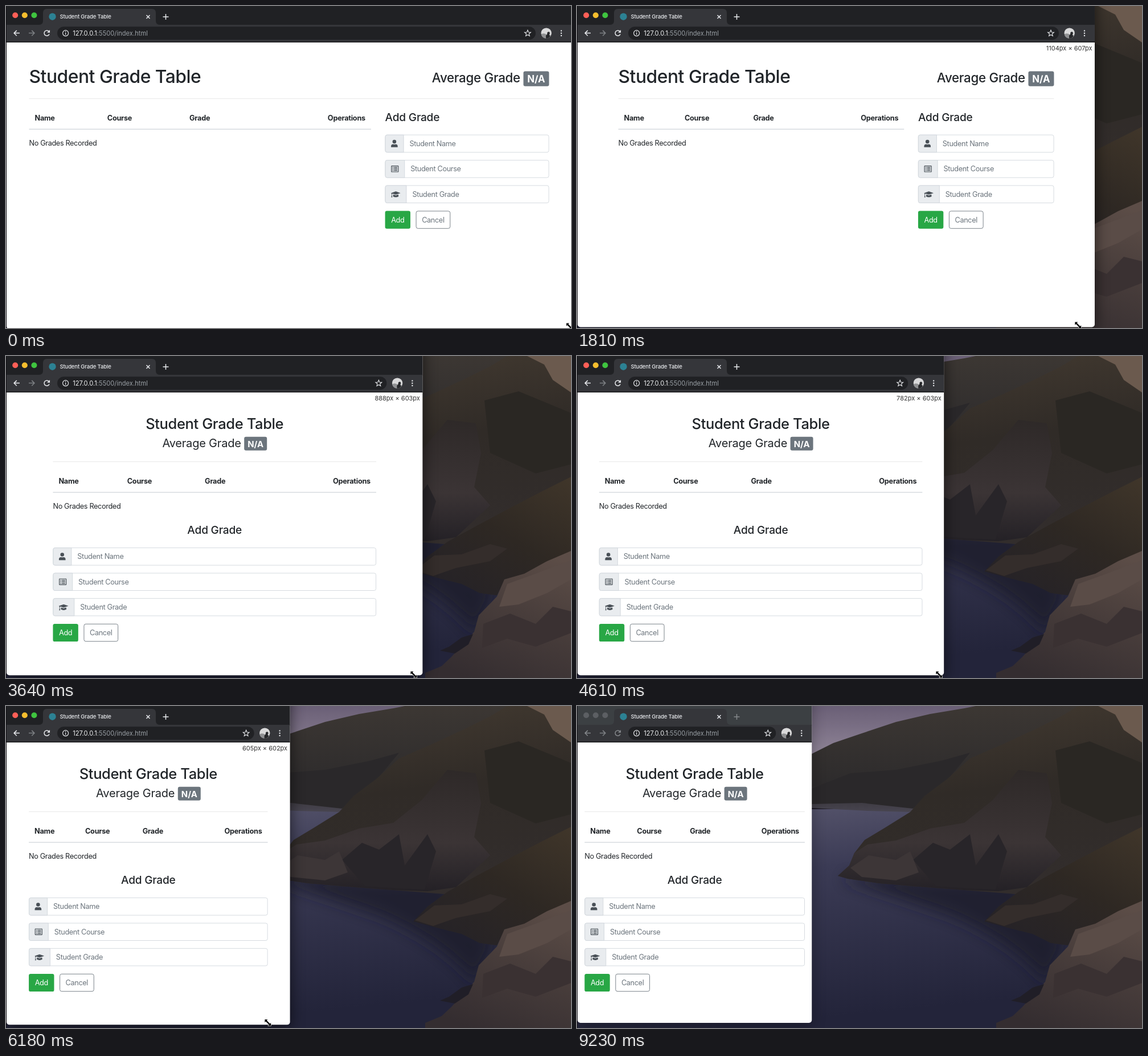
Write an HTML page that moves like this. It is 992 px wide and 565 px high and loops after 9330 ms.

```html
<!DOCTYPE html>
<html lang="en">
<head>
<meta charset="utf-8">
<title>Student Grade Table</title>
<style>
html, body { margin: 0; width: 100%; height: 100%; overflow: hidden; background: #17141d; }
svg { display: block; width: 100vw; height: 100vh; }
text { font-family: Inter, "Open Sans", sans-serif; font-optical-sizing: none; white-space: pre; fill: #212529; }
.body { font-size: 12.7px; letter-spacing: -.028em; }
.head { font-size: 12.7px; font-weight: 700; letter-spacing: -.02em; }
.hint { fill: #6c757d; }
.title { font-size: 31.8px; font-weight: 550; letter-spacing: -.015em; }
.avg { font-size: 22.3px; font-weight: 500; letter-spacing: -.012em; }
.stacked .title { font-size: 25.5px; }
.stacked .avg { font-size: 20px; font-weight: 400; letter-spacing: -.01em; }
.badge { font-size: 16.7px; font-weight: 700; fill: #fff; }
.stacked .badge { font-size: 14.9px; }
.sub { font-size: 19.1px; font-weight: 550; letter-spacing: -.011em; }
.tab { font-size: 9.55px; font-weight: 500; letter-spacing: -.018em; fill: #e8eaed; }
.url { font-size: 11.1px; letter-spacing: .004em; fill: #9aa0a6; }
.size { font-size: 11px; fill: #333; }
.mid { text-anchor: middle; }
.end { text-anchor: end; }
.nav { fill: none; stroke: #e8eaed; stroke-width: 1.5; }
.strip { fill: #202124; }
.bar { fill: #35363a; }
.idle .strip { fill: #3c4043; }
.idle .light { fill: #5c5f63; }
.idle .dim { stroke: #85888c; }
.box { stroke: #ced4da; stroke-width: .83; }
.icon { fill: #495057; }
</style>
</head>
<body>
<svg viewBox="0 0 992 565" preserveAspectRatio="none">
  <defs>
    <linearGradient id="sky" x2="0" y2="1"><stop stop-color="#6a5f76"/><stop offset="1" stop-color="#8f8497"/></linearGradient>
    <linearGradient id="sea" x2=".25" y2="1"><stop stop-color="#5b5970"/><stop offset=".35" stop-color="#3b3b55"/><stop offset="1" stop-color="#23243a"/></linearGradient>
    <linearGradient id="far" x2="0" y2="1"><stop stop-color="#3c3733"/><stop offset=".75" stop-color="#2d2b2c"/><stop offset="1" stop-color="#484550"/></linearGradient>
    <linearGradient id="hill" x2=".2" y2="1"><stop stop-color="#443b31"/><stop offset=".5" stop-color="#302b27"/><stop offset="1" stop-color="#322d2c"/></linearGradient>
    <linearGradient id="cliff" x2="0" y2="1"><stop stop-color="#2e2928"/><stop offset=".6" stop-color="#3b3435"/><stop offset="1" stop-color="#242126"/></linearGradient>
    <linearGradient id="slope" x1="1" x2=".2" y2="1"><stop stop-color="#40362a"/><stop offset=".5" stop-color="#2e2823"/><stop offset="1" stop-color="#252227"/></linearGradient>
    <linearGradient id="rock" x1=".8" x2=".3" y2="1"><stop stop-color="#5c4d47"/><stop offset=".45" stop-color="#483d3b"/><stop offset="1" stop-color="#342d30"/></linearGradient>
    <filter id="blur" x="-30%" y="-30%" width="160%" height="160%"><feGaussianBlur stdDeviation="13"/></filter>
  </defs>

  <g id="desktop">
    <path fill="url(#sky)" d="M0 0H992V86H0Z"/>
    <path fill="url(#sea)" d="M0 181H992V565H0Z"/>
    <path fill="#1d1c2c" opacity=".8" filter="url(#blur)" d="M470 300H770L860 415 825 485Q760 410 650 366Q560 335 470 306Z"/>
    <path fill="url(#far)" d="M0 115H330L412 84 450 65 500 48 560 28 620 14 680 4 700 0H992V186H585L510 184 412 179H0Z"/>
    <path fill="#2a282a" d="M412 145L480 118 560 112 640 96 690 82 640 142 590 180 500 170 412 172Z"/>
    <path fill="url(#hill)" d="M458 298L478 280 487 258 505 235 540 214 585 186 610 158 650 128 690 92 750 66 810 38 850 18 880 0H992V345L770 330 680 323 600 317 530 311 475 303Z"/>
    <path fill="url(#cliff)" d="M458 298L478 280 487 258 510 243 560 236 620 215 680 205 730 165 775 112 825 118 834 170 822 230 850 262 790 318 740 325 680 323 600 317 530 311 475 303Z"/>
    <path fill="#282529" d="M590 270L625 240 655 252 690 225 700 280 740 225 755 255 735 322 690 320 630 316Z"/>
    <path fill="#3d3637" d="M480 284L512 262 560 270 585 255 600 292 560 306 500 300Z"/>
    <path fill="#6b5a4e" d="M915 0L945 15 960 42 992 64V0Z"/>
    <path fill="#2a2723" d="M840 78L900 62 992 100V190L930 206 850 170Z"/>
    <path fill="url(#slope)" d="M715 378L740 352 775 326 830 296 890 264 940 238 992 212V352L950 364 905 386 875 395 862 420 832 416 800 400 760 390Z"/>
    <path fill="#342d2b" d="M718 376L752 350 800 348 850 330 880 338 850 360 790 372 750 386Z"/>
    <path fill="url(#rock)" d="M736 556L765 544 782 528 822 484 830 455 862 422 875 392 910 382 950 360 992 342V565H736Z"/>
    <path fill="#5a4c47" d="M880 400L930 382 992 358V392L950 416 900 436 866 440Z"/>
    <path fill="#3a3132" d="M838 470L885 452 930 470 960 440 992 448V486L930 510 880 496 836 512Z"/>
    <path fill="#201e27" d="M762 517L778 510 800 494 820 488 812 506 788 522Z"/>
    <path fill="#17141d" d="M0 0H1V565H0Z"/>
  </g>

  <rect id="shadow" x="1" y="-30" filter="url(#blur)"/>
  <g id="win">
    <rect id="frame" x="1" y="-20" rx="5" fill="#fff"/>
    <g id="chrome">
      <rect class="strip wide" x="1" height="34"/>
      <rect class="bar wide" x="1" y="33" height="30"/>
      <rect class="wide" x="1" y="62.4" height="1.6" fill="#1d1e20"/>
      <path class="bar" d="M58 33Q65 33 65 26V12Q65 5 72 5H256Q263 5 263 12V26Q263 33 270 33Z"/>
      <circle class="light" cx="16.2" cy="16.2" r="5" fill="#ff5f57"/>
      <circle class="light" cx="32.8" cy="16.2" r="5" fill="#f6be2e"/>
      <circle class="light" cx="49.4" cy="16.2" r="5" fill="#3fc43f"/>
      <circle cx="81.5" cy="18.7" r="6.2" fill="#2c8193"/>
      <text class="tab" x="94.5" y="22.3">Student Grade Table</text>
      <path class="nav" d="M246.5 16l6 6m0-6l-6 6"/>
      <path class="nav dim" d="M280.5 14v10m-5-5h10"/>
      <path class="nav dim" d="M24 47.6H14.2m4.6-4.7l-4.7 4.7 4.7 4.7"/>
      <path class="nav" style="stroke:#7d8084" d="M40 47.6h9.8m-4.6-4.7l4.7 4.7-4.7 4.7"/>
      <path class="nav dim" d="M75.6 45.2A4.6 4.6 0 1 0 76 49.2M76.3 42.6v3.5h-3.6"/>
      <rect id="omni" class="strip" style="fill:#202124" x="90" y="36.2" height="23" rx="11.5"/>
      <circle class="nav" cx="104.6" cy="47.7" r="5" style="stroke-width:1.2"/>
      <path class="nav" style="stroke-width:1.3" d="M104.6 47v3.6m0-6v1.3"/>
      <text class="url" x="117.2" y="51.8"><tspan fill="#f1f3f4">127.0.0.1</tspan>:5500/index.html</text>
      <g id="tools">
        <path id="star" class="nav" style="stroke-width:1.1"/>
        <circle cx="-44.3" cy="47.6" r="9.2" fill="#d9d9da"/>
        <path fill="#8f9092" d="M-53.3 49.5Q-48 47-44 50T-35.6 50.6A9.2 9.2 0 0 1-53.3 49.5Z"/>
        <path fill="#26272a" d="M-45 56.8V52Q-43 50-42.6 48.5A2.4 2.4 0 1 1-39 49.6L-37.6 53.7A9.2 9.2 0 0 1-45 56.8Z"/>
        <path stroke="#e8eaed" stroke-width="2.4" stroke-linecap="round" d="M-18 43.4h.01m-.01 4.3h.01m-.01 4.3h.01"/>
      </g>
    </g>
    <g id="page">
      <text class="title" id="title">Student Grade Table</text>
      <text class="avg end" id="avg">Average Grade</text>
      <rect id="badge" rx="3.2" fill="#6c757d"/>
      <text class="badge mid" id="na">N/A</text>
      <rect id="rule" height=".9" fill="#e6e6e6"/>
      <g id="table">
        <text class="head" x="10" y="201">Name</text>
        <text class="head" id="course" y="201">Course</text>
        <text class="head" id="grade" y="201">Grade</text>
        <text class="head end" id="ops" y="201">Operations</text>
        <rect id="line" y="215.4" height="1.6" fill="#d9dde1"/>
        <text class="body" y="245.4">No Grades Recorded</text>
      </g>
      <g id="form">
        <text class="sub" id="sub" y="-24">Add Grade</text>
        <rect y="133.7" width="44.4" height="31.2" rx="3.2" fill="#28a745"/>
        <text class="body mid" x="22.2" y="153.8" style="fill:#fff">Add</text>
        <rect x="54.5" y="134.1" width="59.7" height="30.4" rx="3.2" fill="#fff" stroke="#6c757d" stroke-width=".9"/>
        <text class="body hint mid" x="84.3" y="153.8">Cancel</text>
      </g>
      <text class="size end" id="size" y="78"></text>
    </g>
  </g>
  <path id="cursor" fill="#000" stroke="#fff" stroke-width="1.1" paint-order="stroke" stroke-linejoin="round"
    d="M-5.6-5.4H-.6L-2.2-3.8 3.5 1.9 5.2.3V5.4H.2L1.8 3.8-3.9-1.9-5.6-.3Z"/>
</svg>
<script>
const LOOP = 9330, SCALE = .8225;
const $ = id => document.getElementById(id);
const set = (node, attrs) => { for (const k in attrs) node.setAttribute(k, attrs[k]); };
const make = (tag, attrs, parent) => {
  const node = document.createElementNS("http://www.w3.org/2000/svg", tag);
  set(node, attrs);
  return parent.appendChild(node);
};

// [start, end, steps] of each run of screen updates
const RUNS = [[710, 1630, 11], [1720, 2570, 10], [2660, 2840, 3], [3110, 3990, 11],
  [4080, 4970, 11], [5060, 5410, 5], [5580, 6440, 11], [6530, 7320, 10]];
// [time, value] keys; page size in CSS pixels, mouse in stage pixels
const WIDTH = [[620, 1206], [1630, 1120], [1814, 1104], [2570, 988], [2840, 967], [3020, 967], [3638, 888],
  [3990, 802], [4614, 782], [4970, 733], [5410, 697], [5490, 697], [6182, 605], [6440, 553], [6950, 500]];
const HEIGHT = [[620, 611], [1814, 607], [3638, 603], [4614, 603], [6182, 602], [7320, 598]];
const MOUSE_X = [[620, 989.5], [1630, 900], [1814, 880], [2570, 797], [2840, 785], [3020, 785], [3638, 716],
  [3990, 651], [4614, 636], [4970, 594], [5410, 562], [5490, 562], [6182, 460], [6440, 428], [7320, 378]];
const MOUSE_Y = [[620, 562], [1814, 560], [3638, 559], [4614, 559], [6182, 555.5], [7320, 554]];

function snap(t) {
  let at = 0;
  for (const [start, end, steps] of RUNS) {
    if (t < start) break;
    const gap = (end - start) / (steps - 1);
    at = start + gap * Math.min(steps - 1, Math.floor((t - start) / gap + .1));
  }
  return at;
}

function tween(keys, t) {
  if (t <= keys[0][0]) return keys[0][1];
  for (let i = 1; i < keys.length; i++) {
    const [t0, a] = keys[i - 1], [t1, b] = keys[i];
    if (t <= t1) return a + (b - a) * (t - t0) / (t1 - t0);
  }
  return keys[keys.length - 1][1];
}

// star outline
const points = [];
for (let i = 0; i < 10; i++) {
  const r = i % 2 ? 2.5 : 5.7, a = i * Math.PI / 5;
  points.push((-77 + r * Math.sin(a)).toFixed(2) + " " + (48 - r * Math.cos(a)).toFixed(2));
}
$("star").setAttribute("d", "M" + points.join("L") + "Z");

const ICONS = [
  "M16.3 9a3.3 3.3 0 1 1 0 6.6a3.3 3.3 0 0 1 0-6.6ZM10.5 22v-1.6q0-3.7 3.6-3.7q2.2.9 4.4 0q3.6 0 3.6 3.7V22Z",
  "M11.8 9.8H22.6q1.2 0 1.2 1.2v9.2q0 1.2-1.2 1.2H11.8q-1.2 0-1.2-1.2V11q0-1.2 1.2-1.2ZM11.8 11v9.2h10.8V11ZM13 12.2h1.6v1.5H13Zm2.6 0h5.8v1.5h-5.8ZM13 14.9h1.6v1.5H13Zm2.6 0h5.8v1.5h-5.8ZM13 17.6h1.6v1.5H13Zm2.6 0h5.8v1.5h-5.8Z",
  "M10.5 13.6L18.8 10.7 27.1 13.6 18.8 16.5 13 14.6 12.2 15.4V18.2L12.8 21.2H10.8L11.4 18V15.2ZM14.4 16.2L18.8 17.7 23.2 16.2 23.7 19.6Q18.8 22.2 13.9 19.6Z"
];
const fields = ["Name", "Course", "Grade"].map((word, i) => {
  const g = make("g", { transform: `translate(0 ${i * 44.4})` }, $("form"));
  const p = [32.5, 34.2, 37.4][i];
  const box = make("rect", { class: "box", x: .4, y: .4, height: 30.5, rx: 3.2, fill: "#fff" }, g);
  make("path", { class: "box", fill: "#e9ecef", d: `M${p} .4H3.6Q.4 .4 .4 3.6V27.7Q.4 30.9 3.6 30.9H${p}Z` }, g);
  make("path", { class: "icon", "fill-rule": "evenodd", d: ICONS[i] }, g);
  make("text", { class: "body hint", x: p + 10.4, y: 20.2 }, g).textContent = "Student " + word;
  return box;
});

function layout(w, h) {
  const edge = 1 + w * SCALE, bottom = 64.2 + h * SCALE;
  const stacked = w < 992;
  const box = w >= 1200 ? 1140 : w >= 992 ? 960 : w >= 768 ? 720 : w >= 576 ? 540 : w;
  const inner = (box - 30) * SCALE, mid = 1 + w * SCALE / 2;
  const left = mid - inner / 2, right = mid + inner / 2;
  const tableW = stacked ? inner : (box * 2 / 3 - 30) * SCALE;
  const formW = stacked ? inner : (box / 3 - 30) * SCALE;

  set($("frame"), { width: edge - 1, height: bottom + 20 });
  set($("shadow"), { width: edge - 1, height: bottom + 36 });
  document.querySelectorAll(".wide").forEach(n => n.setAttribute("width", edge - 1));
  set($("omni"), { width: edge - 153 });
  set($("tools"), { transform: `translate(${edge} 0)` });

  set($("page"), { class: stacked ? "stacked" : "" });
  set($("title"), { x: stacked ? mid : left, y: stacked ? 128.4 : 135, "text-anchor": stacked ? "middle" : "start" });
  const bx = stacked ? mid + 52 : right - 45, bw = stacked ? 40 : 45;
  set($("avg"), { x: bx - 5.5, y: stacked ? 160 : 133.8 });
  set($("badge"), { x: bx, y: stacked ? 141.8 : 114.4, width: bw, height: stacked ? 24 : 26.4 });
  set($("na"), { x: bx + bw / 2, y: stacked ? 159.6 : 134 });
  set($("rule"), { x: left, y: stacked ? 185 : 162.2, width: inner });

  set($("table"), { transform: `translate(${left} ${stacked ? 23.1 : 0})` });
  set($("course"), { x: 10 + tableW * .212 });
  set($("grade"), { x: 10 + tableW * .4523 });
  set($("ops"), { x: tableW - 10 });
  set($("line"), { width: tableW });

  const formX = stacked ? left : left + box * 2 / 3 * SCALE;
  set($("form"), { transform: `translate(${formX} ${stacked ? 336.2 : 225.8})` });
  set($("sub"), { x: stacked ? inner / 2 : 0, "text-anchor": stacked ? "middle" : "start" });
  fields.forEach(f => f.setAttribute("width", formW - .8));

  $("size").textContent = `${Math.round(w)}px × ${Math.round(h)}px`;
  set($("size"), { x: edge - 4.5 });
}

function render(t) {
  const at = snap(t);
  layout(tween(WIDTH, at), tween(HEIGHT, at));
  const idle = t >= 9230;
  set($("chrome"), { class: idle ? "idle" : "" });
  set($("shadow"), { opacity: idle ? .3 : .6 });
  set($("size"), { opacity: t < 710 || t >= 7860 ? 0 : t >= 7770 ? .5 : 1 });

  let x = tween(MOUSE_X, at), y = tween(MOUSE_Y, at);
  if (t >= 8210) [x, y] = [511, 562];
  set($("cursor"), { transform: `translate(${x} ${y})`, visibility: t >= 8300 ? "hidden" : "visible" });
}

function tick(now) {
  render(now % LOOP);
  requestAnimationFrame(tick);
}
render(0);
requestAnimationFrame(tick);
</script>
</body>
</html>
```
